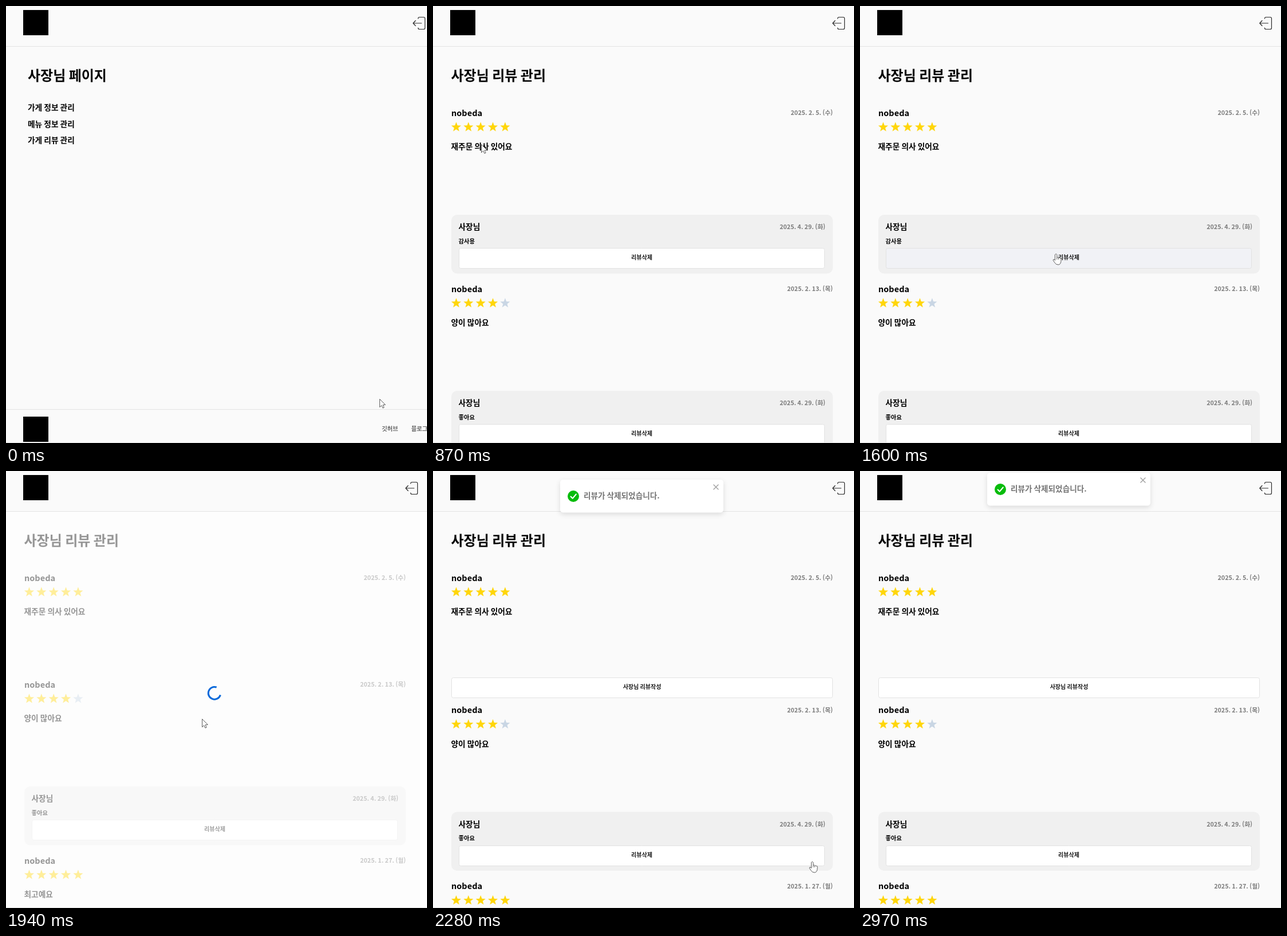
Recreate the animation shown at these times as an HTML page with a canvas. Size 735 by 762 pixels, loop 3.5 s.

```html
<!DOCTYPE html>
<html lang="ko">
<head>
<meta charset="utf-8">
<title>사장님 페이지</title>
<style>
html, body { margin: 0; width: 100%; height: 100%; overflow: hidden; background: #fafafa; }
canvas { display: block; }
</style>
</head>
<body>
<canvas id="stage" width="735" height="762"></canvas>
<script>
const ctx = document.getElementById('stage').getContext('2d');
const W = 735, H = 762, LOOP = 3500, TICK = 1000 / 15;
const FONT = '"Noto Sans CJK KR", "Noto Sans CJK JP", "Noto Sans CJK", sans-serif';
const BG = '#fafafa', BLUE = '#0969da', LINE = '#e4e4e4', GRAY = '#7b7b7b';
const USER = 'nobeda';

// Pointer stops: time, x, y
const PATH = [
  [0, 652, 685], [533, 74, 235], [667, 74, 235], [867, 84, 241],
  [1200, 341, 388], [1600, 342, 432], [1933, 342, 432],
  [2266, 662, 681], [2800, 711, 754], [2933, 712, 766]
];
const T = { page: 730, load: 1798, removed: 1930, ready: 2065, toast: 1902 };

function label(str, x, mid, size, color = '#000', align = 'left') {
  ctx.font = `700 ${size}px ${FONT}`;
  ctx.textAlign = align;
  ctx.fillStyle = color;
  ctx.fillText(str, x, Math.round(mid + size * 0.38));
}

function box(x, y, w, h, r, fill, stroke) {
  ctx.beginPath();
  ctx.roundRect(x, y, w, h, r);
  ctx.fillStyle = fill;
  ctx.fill();
  if (stroke) {
    ctx.strokeStyle = stroke;
    ctx.lineWidth = 1;
    ctx.stroke();
  }
}

function poly(points, close) {
  ctx.beginPath();
  points.forEach(([x, y]) => ctx.lineTo(x, y));
  if (close) ctx.closePath();
}

function rule(y) {
  ctx.fillStyle = LINE;
  ctx.fillRect(0, y, W, 1);
}

function logo(y) {
  ctx.fillStyle = '#000';
  ctx.fillRect(30, y, 44, 44);
}

function exitIcon(x) {
  ctx.save();
  ctx.translate(x, 30);
  ctx.strokeStyle = '#2a2a2a';
  ctx.lineWidth = 1.2;
  ctx.lineCap = ctx.lineJoin = 'round';
  ctx.beginPath();
  ctx.moveTo(9.5, -8);
  ctx.arcTo(9.5, -10.5, 12, -10.5, 2.3);
  ctx.arcTo(21.5, -10.5, 21.5, 0, 2.3);
  ctx.arcTo(21.5, 10.5, 12, 10.5, 2.3);
  ctx.arcTo(9.5, 10.5, 9.5, 8, 2.3);
  ctx.lineTo(9.5, 8);
  ctx.moveTo(15.5, 0);
  ctx.lineTo(0.8, 0);
  ctx.moveTo(5, -4.5);
  ctx.lineTo(0.8, 0);
  ctx.lineTo(5, 4.5);
  ctx.stroke();
  ctx.restore();
}

function star(cx, cy, color) {
  const pts = Array.from({ length: 10 }, (_, i) => {
    const r = i % 2 ? 3.8 : 9, a = (i / 5 - 0.5) * Math.PI;
    return [cx + r * Math.cos(a), cy + r * Math.sin(a)];
  });
  poly(pts, true);
  ctx.fillStyle = color;
  ctx.fill();
}

function button(x, y, w, text, fill = '#fff') {
  box(x + 0.5, Math.round(y) + 0.5, w - 1, 35, 3, fill, '#e2e2e2');
  label(text, x + w / 2, y + 16.5, 10, '#1c1c1c', 'center');
}

function review(y, date, score, text) {
  label(USER, 32, y, 14.5);
  label(date, 698, y, 10.7, GRAY, 'right');
  for (let i = 0; i < 5; i++) {
    star(40.5 + i * 21.35, y + 25.3, i < score ? '#ffd60a' : '#c9d6e4');
  }
  label(text, 31.5, y + 59, 13.7);
}

function reply(y, text, hover) {
  box(32, y + 178, 666, 102.5, 10, '#f0f0f0');
  label('사장님', 44.5, y + 199, 13.7);
  label('2025. 4. 29. (화)', 685, y + 199, 10.7, GRAY, 'right');
  label(text, 44.5, y + 224, 10.3);
  button(45, y + 236, 639, '리뷰삭제', hover ? '#f1f2f6' : '#fff');
}

function ownerPage(p) {
  exitIcon(710);
  label('사장님 페이지', 38, 121, 24);
  const hot = inside(p, 38, 224, 82, 20);
  ['가게 정보 관리', '메뉴 정보 관리', '가게 리뷰 관리'].forEach((s, i) => {
    label(s, 38, 177 + i * 28.4, 13.7, hot && i === 2 ? BLUE : '#000');
  });
  rule(703);
  logo(716);
  label('깃허브', 656, 737.5, 10.4, '#6a6a6a');
  label('블로그', 707.5, 737.5, 10.4, '#6a6a6a');
  return hot;
}

function reviewPage(t, p) {
  const loading = t >= T.load && t < T.ready;
  const second = t < T.removed ? 493 : t < T.ready ? 372 : 416.5;
  const over = y => !loading && inside(p, 45, y + 236, 639, 36);
  const hot1 = t < T.load && over(186), hot2 = over(second);

  exitIcon(697);
  label('사장님 리뷰 관리', 31.5, 121, 24);
  review(186, '2025. 2. 5. (수)', 5, '재주문 의사 있어요');
  if (t < T.removed) reply(186, '감사용', hot1);
  else if (!loading) button(32, 359.5, 666, '사장님 리뷰작성');
  review(second, '2025. 2. 13. (목)', 4, '양이 많아요');
  reply(second, '좋아요');
  review(second + 307, '2025. 1. 27. (월)', 5, '최고예요');

  if (loading) {
    const fade = Math.min(1, (t - T.load + TICK) / 200);
    ctx.fillStyle = `rgba(255,255,255,${0.59 * fade})`;
    ctx.fillRect(0, 71, W, H - 71);
    const a = (t - 1933) / 800 * Math.PI * 2;
    ctx.beginPath();
    ctx.arc(364, 387.3, 10.8, a + 0.3, a + 5.05);
    ctx.strokeStyle = BLUE;
    ctx.lineWidth = 3;
    ctx.lineCap = 'butt';
    ctx.stroke();
  }
  return hot1 || hot2;
}

// Drop in, overshoot and settle
function bounce(ms) {
  const keys = [[0, -2100], [420, 17], [525, -7], [630, 3.5], [700, 0]];
  const i = keys.findIndex(k => ms < k[0]);
  if (i < 0) return 0;
  const [t0, a] = keys[i - 1], [t1, b] = keys[i];
  return a + (b - a) * (1 - (1 - (ms - t0) / (t1 - t0)) ** 3);
}

function toast(t) {
  if (t < T.toast) return;
  ctx.save();
  ctx.translate(0, Math.round(bounce(t - T.toast)));
  ctx.shadowColor = 'rgba(0,0,0,0.13)';
  ctx.shadowBlur = 10;
  ctx.shadowOffsetY = 3;
  box(222, 3, 285, 57.5, 5, '#fff');
  ctx.shadowColor = 'transparent';
  box(235, 22, 20, 20, 10, '#07bc0c');
  ctx.lineCap = ctx.lineJoin = 'round';
  ctx.strokeStyle = '#fff';
  ctx.lineWidth = 2;
  poly([[240.5, 32.5], [243.7, 35.8], [249.8, 28.5]]);
  ctx.stroke();
  label('리뷰가 삭제되었습니다.', 263, 30.5, 13.6, '#757575');
  ctx.strokeStyle = '#a6a6a6';
  ctx.lineWidth = 1.6;
  for (const d of [-4, 4]) {
    poly([[494 - d, 12], [494 + d, 20]]);
    ctx.stroke();
  }
  ctx.restore();
}

function pointerAt(t) {
  const i = PATH.findIndex(k => t < k[0]);
  if (i < 0) return { x: 712, y: 800 };
  const [t0, x0, y0] = PATH[i - 1], [t1, x1, y1] = PATH[i];
  const u = (t - t0) / (t1 - t0), e = u * u * (3 - 2 * u);
  return { x: x0 + (x1 - x0) * e, y: y0 + (y1 - y0) * e };
}

function inside(p, x, y, w, h) {
  return p.x >= x && p.x < x + w && p.y >= y && p.y < y + h;
}

function pointer(p, hand) {
  ctx.save();
  ctx.translate(Math.round(p.x) + 0.5, Math.round(p.y) + 0.5);
  ctx.lineJoin = 'round';
  ctx.lineWidth = 0.9;
  ctx.strokeStyle = '#4a4a4a';
  ctx.fillStyle = '#fff';
  if (hand) {
    ctx.beginPath();
    ctx.moveTo(-2, 11);
    ctx.lineTo(-2, 1);
    ctx.quadraticCurveTo(-0.3, -1.6, 1.3, 1);
    ctx.lineTo(1.3, 6);
    ctx.quadraticCurveTo(3, 4.8, 4, 6.6);
    ctx.quadraticCurveTo(5.6, 5.6, 6.4, 7.3);
    ctx.quadraticCurveTo(8.6, 6.8, 8.6, 9);
    ctx.lineTo(8.4, 13);
    ctx.quadraticCurveTo(7.6, 18.6, 3.5, 18.6);
    ctx.quadraticCurveTo(-0.5, 18.8, -2.5, 15);
    ctx.lineTo(-5.3, 11);
    ctx.quadraticCurveTo(-5.3, 8.6, -3.4, 9.6);
    ctx.closePath();
    ctx.fill();
    ctx.stroke();
    poly([[1.3, 6], [1.3, 9.5]]);
    ctx.stroke();
    poly([[4, 6.6], [4, 9.5]]);
    ctx.stroke();
  } else {
    poly([[0, 0], [0, 14], [3.2, 11], [5.4, 15.6], [7.6, 14.6], [5.5, 10.2], [9.8, 9.8]], true);
    ctx.fill();
    ctx.stroke();
  }
  ctx.restore();
}

function draw(now) {
  const ms = now % LOOP;
  const t = Math.floor((ms + 5) / TICK) * TICK;
  const p = pointerAt(t);
  ctx.fillStyle = BG;
  ctx.fillRect(0, 0, W, H);
  logo(7);
  rule(70);
  const hand = t < T.page ? ownerPage(p) : reviewPage(t, p);
  toast(t);
  rule(761);
  pointer(p, hand);
}

const start = performance.now();
function frame() {
  draw(performance.now() - start);
  requestAnimationFrame(frame);
}
frame();
</script>
</body>
</html>
```
